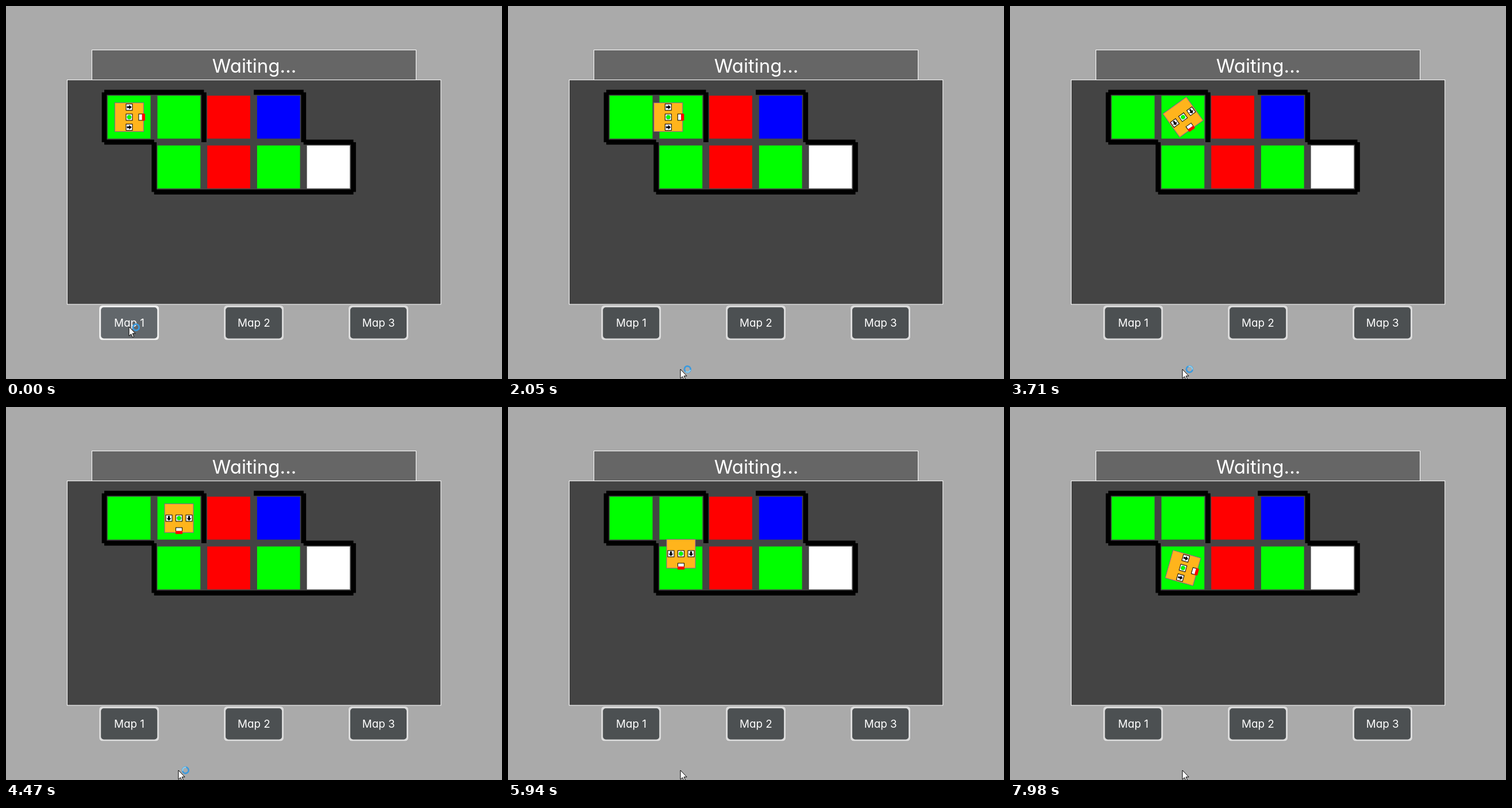
Write an HTML page that moves like this. It is 863x649 px and loops after 8000 ms.

```html
<!DOCTYPE html>
<html lang="en">
<head>
<meta charset="utf-8">
<title>Robot map</title>
<style>
  html, body { margin: 0; width: 100%; height: 100%; overflow: hidden; background: #aaa; }
  svg { display: block; width: 100%; height: 100%; }
  text {
    font-family: Inter, "Open Sans", sans-serif;
    font-feature-settings: "cv11";
    fill: #fff;
    text-anchor: middle;
  }
</style>
</head>
<body>
<svg viewBox="0 0 863 649">
  <defs>
    <g id="motor">
      <rect x="-5.5" y="-5.5" width="11" height="11" fill="#fff" stroke="#000"/>
      <path d="M-4-1.5H0V-4.2L4.3 0L0 4.2V1.5H-4Z"/>
    </g>
  </defs>
  <rect width="863" height="649" fill="#aaa"/>
  <rect x="149.5" y="76.5" width="564" height="52" fill="#666" stroke="#fff"/>
  <rect x="106.5" y="128.6" width="650.2" height="390.4" fill="#444" stroke="#fff"/>
  <text x="432" y="115.5" font-size="33.1">Waiting...</text>
  <g id="cells"></g>
  <path id="walls" fill="none" stroke="#000" stroke-width="8.7"/>
  <g id="buttons"></g>
  <g id="robot">
    <rect x="-25" y="-25" width="50" height="50" fill="#ffb41c" stroke="#8c5a96"/>
    <use href="#motor" y="-17.5"/>
    <use href="#motor" y="17.5"/>
    <rect x="-5.5" y="-5.5" width="11" height="11" fill="#fff" stroke="#000"/>
    <circle r="3.7" fill="#0f0" stroke="#3a3" stroke-width=".5"/>
    <rect x="16.5" y="-5.5" width="8" height="11" fill="#fff" stroke="#000"/>
    <rect x="22.2" y="-6" width="5.3" height="12" fill="#f00"/>
  </g>
  <g id="cursor">
    <path d="M.5.5V16.6L4.1 13.2L6.7 18.9L9.1 17.8L6.6 12.3H11.6Z" fill="#fff" stroke="#000"/>
    <g id="spinner" fill="none">
      <circle r="5.3" stroke="#3b9ade" stroke-width="2.8"/>
      <circle id="glint" r="5" stroke="#8fcdea" stroke-width="2.4" stroke-dasharray="10 21.4"/>
    </g>
  </g>
</svg>
<script>
const LOOP = 8000, STEP = 47.5, FIRST = 40;
const LEFT = 171, TOP = 150.2, PITCH = 86.7;
const el = id => document.getElementById(id);
const gx = i => LEFT + i * PITCH;
const gy = j => TOP + j * PITCH;

// Grid cells: column, row, colour
const cells = [
  [0, 0, '#0f0'], [1, 0, '#0f0'], [2, 0, '#f00'], [3, 0, '#00f'],
  [1, 1, '#0f0'], [2, 1, '#f00'], [3, 1, '#0f0'], [4, 1, '#fff']
];
el('cells').innerHTML = cells.map(([i, j, color]) =>
  `<rect x="${gx(i) + 5.8}" y="${gy(j) + 5.8}" width="74.7" height="74.7" fill="${color}"/>`).join('');

// Walls between grid points
const walls = [
  [0, 0, 2, 0], [0, 0, 0, 1], [0, 1, 1, 1], [1, 1, 1, 2], [1, 2, 5, 2],
  [5, 1, 5, 2], [4, 1, 5, 1], [4, 0, 4, 1], [3, 0, 4, 0], [2, 0, 2, 1]
];
el('walls').setAttribute('d', walls.map(([a, b, c, d]) =>
  `M${gx(a)} ${gy(b)}L${gx(c)} ${gy(d)}`).join(''));

el('buttons').innerHTML = [214.2, 431.1, 648].map((x, n) =>
  `<rect x="${x - 52.5}" y="520.5" width="105" height="61.5" rx="6" fill="#9e9e9e"/>
   <rect class="edge" x="${x - 52}" y="521" width="104" height="60.3" rx="5.5" fill="#dcdcdc"/>
   <rect class="face" x="${x - 49}" y="524.2" width="98" height="54.3" rx="5" fill="#4c5052"/>
   <text x="${x + 0.2}" y="558" font-size="18.8">Map ${n + 1}</text>`).join('');
const edge = document.querySelector('.edge');
const face = document.querySelector('.face');

const progress = (t, from, to) => Math.min(1, Math.max(0, (t - from) / (to - from)));
const smooth = p => p * p * (3 - 2 * p);

function draw(time) {
  const t = time < FIRST ? 0 : FIRST + Math.floor((time - FIRST) / STEP) * STEP;

  const x = 214.4 + 86.6 * progress(t, 566, 2540);
  const y = 193.4 + 86.7 * progress(t, 4521, 6494);
  const angle = 90 * (progress(t, 2733, 4333) - progress(t, 6610, 8262));
  el('robot').setAttribute('transform', `translate(${x} ${y}) rotate(${angle})`);

  const move = smooth(progress(t, 150, 620));
  const cx = 213.5 + 86 * move, cy = 557.5 + 74 * move;
  el('cursor').setAttribute('transform', `translate(${cx} ${cy})`);
  const hover = cy < 581;
  edge.setAttribute('fill', hover ? '#f0f0f0' : '#dcdcdc');
  face.setAttribute('fill', hover ? '#62676b' : '#4c5052');

  const waiting = t < 5600;
  el('spinner').setAttribute('visibility', waiting ? 'visible' : 'hidden');
  el('spinner').setAttribute('transform', `translate(12.8 ${1.5 - move}) rotate(${t * 0.36})`);
  el('glint').setAttribute('visibility', waiting && t >= FIRST ? 'visible' : 'hidden');
}

const start = performance.now();
function tick() {
  draw((performance.now() - start) % LOOP);
  requestAnimationFrame(tick);
}
draw(0);
requestAnimationFrame(tick);
</script>
</body>
</html>
```
